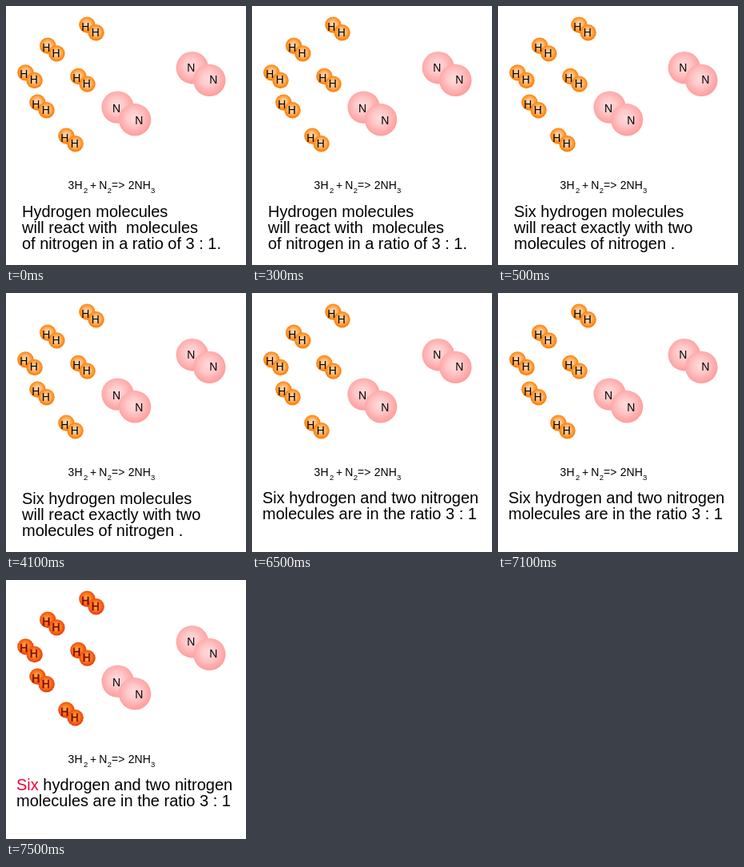
Recreate the animation shown at these times as an HTML page. Size 300 by 324 pixels, loop 8000 ms.

```html
<!DOCTYPE html>
<html lang="en">
<head>
<meta charset="utf-8">
<title>Hydrogen and nitrogen ratio</title>
<style>
  html, body { margin: 0; width: 100%; height: 100%; overflow: hidden; background: #fff; }
  svg { display: block; width: 300px; height: 324px; }
  text { font-family: "Liberation Sans", Arial, sans-serif; white-space: pre; }
  .atom { font-size: 14px; text-anchor: middle; }
  .eq { font-size: 14px; }
  .sub { font-size: 9.5px; }
  .caption { font-size: 20px; }
  .hot { fill: #5c0800; stroke: #a01400; stroke-width: .7px; }
</style>
</head>
<body>
<svg id="stage" viewBox="0 0 300 324">
  <defs>
    <radialGradient id="orange" cx=".5" cy=".47" r=".54">
      <stop offset="0" stop-color="#ffe2c4"/>
      <stop offset=".45" stop-color="#ffb974"/>
      <stop offset=".85" stop-color="#ff850c"/>
      <stop offset="1" stop-color="#f77800"/>
    </radialGradient>
    <radialGradient id="red" cx=".48" cy=".46" r=".56">
      <stop offset="0" stop-color="#ffb060"/>
      <stop offset=".5" stop-color="#fb7a1c"/>
      <stop offset=".82" stop-color="#f0500c"/>
      <stop offset="1" stop-color="#d62400"/>
    </radialGradient>
    <radialGradient id="pink" cx=".47" cy=".45" r=".57">
      <stop offset="0" stop-color="#ffdcdc"/>
      <stop offset=".4" stop-color="#ffc8c8"/>
      <stop offset="1" stop-color="#ff9999"/>
    </radialGradient>
  </defs>
</svg>
<script>
const stage = document.getElementById('stage');
const LOOP = 8000;

function add(parent, tag, attrs, content = '') {
  const el = document.createElementNS('http://www.w3.org/2000/svg', tag);
  for (const key in attrs) el.setAttribute(key, attrs[key]);
  el.textContent = content;
  parent.appendChild(el);
  return el;
}

const group = () => add(stage, 'g', {});

// Two overlapping balls, the right one in front, with a letter on each.
function molecule(parent, [x, y, lift = 0], kind, fill, cls = '') {
  for (const [dx, dy] of [[0, 0], kind.shift]) {
    add(parent, 'circle', { cx: x + dx, cy: y + dy, r: kind.r, fill: `url(#${fill})` });
  }
  for (const [dx, dy] of kind.letters) {
    add(parent, 'text', { x: x + dx, y: y + dy - lift, class: 'atom ' + cls }, kind.name);
  }
}

const H = { name: 'H', r: 10.2, shift: [11.2, 9.6], letters: [[-2, 7], [10.4, 14]] };
const N = { name: 'N', r: 20.2, shift: [21.5, 15.7], letters: [[-1.6, 6.4], [26.6, 21.4]] };
const hydrogens = [[101.4, 23.6], [52.2, 49.8], [24.4, 83.4], [90.4, 88], [39.4, 120.6], [75.4, 162.6]];
const nitrogens = [[139.6, 126.6], [232.8, 77.2, 1.6]];

const cool = group(), hot = group(), rest = group();
for (const at of hydrogens) {
  molecule(cool, at, H, 'orange');
  molecule(hot, at, H, 'red', 'hot');
}
for (const at of nitrogens) molecule(rest, at, N, 'pink');

const equation = [
  [77.6, '3H'], [97, '2', 1], [105, '+'], [116.2, 'N'],
  [126.8, '2', 1], [132, '=>'], [152.8, '2NH'], [181, '3', 1]
];
for (const [x, part, low] of equation) {
  add(rest, 'text', { x, y: low ? 233.5 : 228.6, class: low ? 'sub' : 'eq' }, part);
}

function caption(x, y, lines) {
  const g = group();
  lines.forEach((line, i) => add(g, 'text', { x, y: y + 20 * i, class: 'caption' }, line));
  return g;
}

const captions = [
  { from: 0, el: caption(20, 264, ['Hydrogen molecules', 'will react with  molecules', 'of nitrogen in a ratio of 3 : 1.']) },
  { from: 500, el: caption(20, 264, ['Six hydrogen molecules', 'will react exactly with two', 'molecules of nitrogen .']) },
  { from: 6500, el: caption(13, 263, ['', 'molecules are in the ratio 3 : 1']) }
];
const heading = captions[2].el.firstChild;
const six = add(heading, 'tspan', {}, 'Six');
add(heading, 'tspan', {}, ' hydrogen and two nitrogen');

const show = (el, on) => el.setAttribute('display', on ? 'inline' : 'none');

function draw(t) {
  captions.forEach(({ from, el }, i) => {
    const next = captions[i + 1];
    show(el, t >= from && (!next || t < next.from));
  });
  const lit = t >= 7500;
  show(cool, !lit);
  show(hot, lit);
  six.setAttribute('fill', lit ? '#f5002f' : '#000');
}

const start = performance.now();
function tick() {
  draw((performance.now() - start) % LOOP);
  requestAnimationFrame(tick);
}
tick();
</script>
</body>
</html>
```
